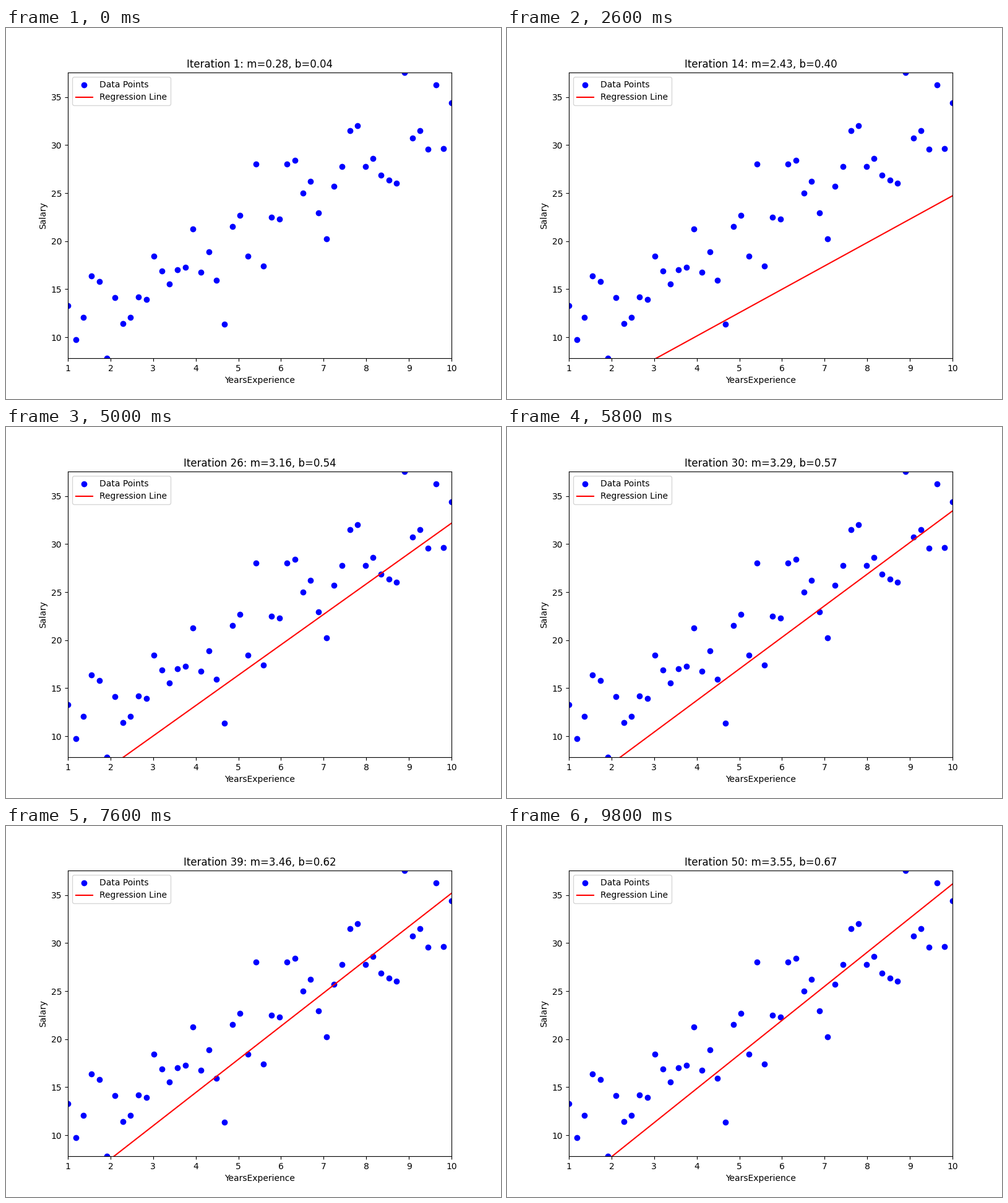
Write a matplotlib script that moves like this. It is 800x600 px and loops after 10000 ms.

```python
import numpy as np
import matplotlib.pyplot as plt
from matplotlib.animation import FuncAnimation

STEPS = 50
RATE = 0.001

np.random.seed(0)
x = np.linspace(1, 10, 50)
y = 3 * x + 5 + np.random.normal(0, 3, 50)


def descend(x, y, steps, rate):
    """Gradient descent on the mean squared error; returns (m, b) per step."""
    m = b = 0.0
    path = []
    for _ in range(steps):
        err = y - (m * x + b)
        m, b = m + 2 * rate * np.mean(x * err), b + 2 * rate * np.mean(err)
        path.append((m, b))
    return path


path = descend(x, y, STEPS, RATE)

fig, ax = plt.subplots(figsize=(8, 6), dpi=100)
ax.scatter(x, y, color="blue", label="Data Points")
line, = ax.plot([], [], color="red", label="Regression Line")
ax.set_xlim(x.min(), x.max())
ax.set_ylim(y.min(), y.max())
ax.set_xlabel("YearsExperience")
ax.set_ylabel("Salary")
ax.legend(loc="upper left")


def update(i):
    m, b = path[i]
    line.set_data(x, m * x + b)
    ax.set_title(f"Iteration {i + 1}: m={m:.2f}, b={b:.2f}")
    return line,


anim = FuncAnimation(fig, update, frames=STEPS, interval=200,
                     repeat=True, repeat_delay=0, blit=False)
plt.show()
```
